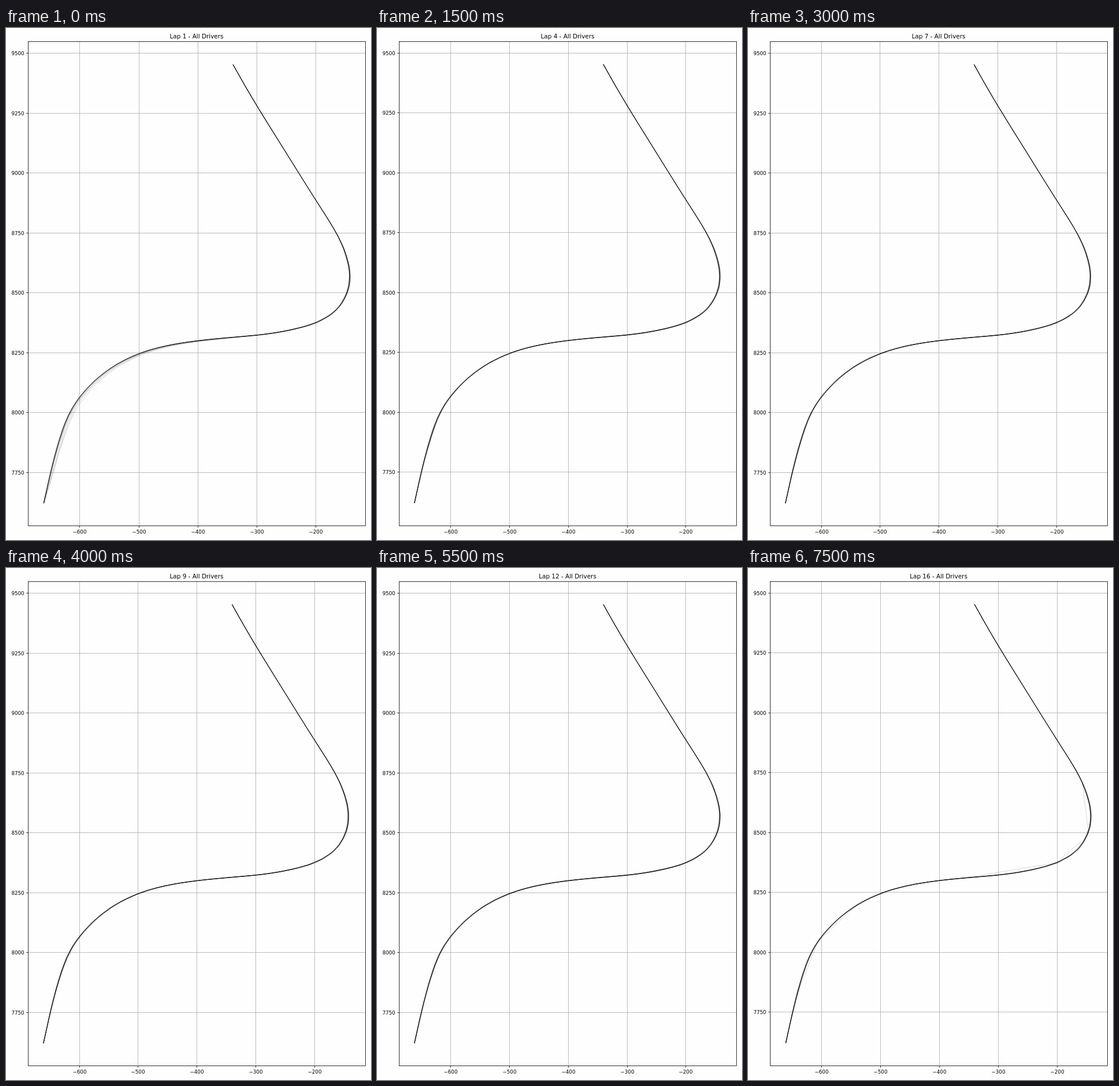
These frames come from a looping animation (632x885 px, 8 s). An HTML page:

```html
<!DOCTYPE html>
<html lang="en">
<head>
<meta charset="utf-8">
<title>Racing lines by lap</title>
<style>
html, body { margin: 0; width: 100%; height: 100%; overflow: hidden; background: #fefefe; }
svg { display: block; width: 632px; height: 885px; font: 8.7px "DejaVu Sans", sans-serif; }
.grid { stroke: #b0b0b0; stroke-width: .85; }
.axis { stroke: #000; stroke-width: .8; fill: none; }
.line { stroke: #000; stroke-width: .8; stroke-opacity: .19; fill: none; stroke-linejoin: round; }
</style>
</head>
<body>
<svg id="plot" viewBox="0 0 632 885"></svg>
<script>
const LAPS = 16, LAP_MS = 500, DRIVERS = 20;
const BOX = { left: 38.5, right: 622.5, top: 23.5, bottom: 860.5 };

// Ideal line through the corner, in the scale of the first lap.
const TRACK = [
  [393, 63], [411, 95], [434, 134], [461, 177.5], [487, 219], [507, 251], [530, 287.5],
  [547, 314], [561, 336], [573, 356.5], [583, 377], [590, 397], [594, 414], [595.3, 429],
  [594, 445], [590, 458.5], [583.5, 472], [574, 485], [560, 497], [538, 509], [515, 516.5],
  [490, 522.5], [462, 527.5], [434, 531], [400, 534], [365, 537], [332, 540.5], [305, 544.2],
  [280, 548.7], [255, 554.7], [231, 562.5], [208, 572.5], [187, 584], [168, 597.5],
  [152, 611], [137, 626.5], [125, 641], [115, 656], [106, 673.5], [98, 694], [88, 726],
  [78, 765], [71, 796], [65.3, 821.5]
];

// Place of the -600 tick and spacing of the x ticks, by lap.
const X_START = [127.9, 127.5, 127.3, 127.3, 127.2, 127.2, 127.2, 127.2, 127.2, 127.2, 127.3, 127.3, 127.7, 128, 127.9, 127.8];
const X_STEP = [102.1, 102, 101.9, 101.9, 101.8, 101.8, 101.75, 101.75, 101.75, 101.8, 101.85, 101.9, 101.8, 101.8, 101.8, 101.8];
const Y_START = [43.7, 43.6, 43.4, 43.4, 43.6, 43.6, 43.7, 43.6, 43.7, 43.6, 43.6, 43.6, 43.7, 43.45, 43.45, 43.45];
const Y_STEP = 103.5;

// Missing samples, as [driver, from y, to y].
const GAPS = {
  14: [[3, 537, 560]],
  16: [[4, 372, 458], [5, 466, 510], [5, 510, 536], [6, 583, 645], [7, 645, 735]]
};

function random(seed) {
  let s = seed;
  return () => {
    s = s + 0x6D2B79F5 | 0;
    let t = Math.imul(s ^ s >>> 15, 1 | s);
    t = t + Math.imul(t ^ t >>> 7, 61 | t) ^ t;
    return ((t ^ t >>> 14) >>> 0) / 4294967296;
  };
}

const bump = (v, from, to) => v > from && v < to ? Math.sin(Math.PI * (v - from) / (to - from)) : 0;

// Catmull-Rom point and unit normal at u, counted in track points.
function trackAt(u) {
  const i = Math.min(Math.floor(u), TRACK.length - 2), t = u - i;
  const p = k => TRACK[Math.max(0, Math.min(TRACK.length - 1, i + k))];
  const axis = n => {
    const [a, b, c, d] = [p(-1)[n], p(0)[n], p(1)[n], p(2)[n]];
    const k1 = c - a, k2 = 2 * a - 5 * b + 4 * c - d, k3 = 3 * b - a - 3 * c + d;
    return [b + (k1 * t + k2 * t * t + k3 * t ** 3) / 2, k1 + 2 * k2 * t + 3 * k3 * t * t];
  };
  const [x, dx] = axis(0), [y, dy] = axis(1), len = Math.hypot(dx, dy);
  return { x, y, nx: -dy / len, ny: dx / len };
}

function driverLine(lap, driver) {
  const rnd = random(lap * 977 + driver * 131);
  const phase = rnd() * 6.3, freq = .35 + rnd() * .3, bias = rnd() - .5;
  const gaps = (GAPS[lap] || []).filter(g => g[0] === driver);
  const wide = lap === 1 && driver < 5 ? (driver + 1) * 1.35 : 0;
  const sx = X_STEP[lap - 1] / X_STEP[0], end = TRACK.length - 1;

  const samples = [0];
  for (let u = .3 + rnd(); u < end - .3; u += .85 + rnd() * .25) samples.push(u);
  samples.push(end);
  for (const [, from, to] of gaps)
    for (const y of [from, to]) {
      const i = TRACK.findIndex(p => p[1] > y) - 1;
      samples.push(i + (y - TRACK[i][1]) / (TRACK[i + 1][1] - TRACK[i][1]));
    }
  samples.sort((a, b) => a - b);

  const points = samples.map(trackAt)
    .filter(p => !gaps.some(g => p.y > g[1] + 1 && p.y < g[2] - 1))
    .map(p => {
      const spread = .3 + .7 * bump(p.y, 350, 540) + .6 * bump(p.y, 542, 800);
      const off = spread * (bias + .8 * Math.sin(p.y * .045 * freq + phase) * (rnd() + .3));
      const slip = -wide * bump(p.y, 533, 816) ** .6;
      const x = p.x + p.nx * off - p.nx * slip * Math.sign(p.nx);
      const y = p.y + p.ny * off - p.ny * slip * Math.sign(p.ny);
      // Outside entries drift to the lower right of the ideal line.
      const px = wide ? x - 2 * Math.min(0, x - p.x - p.nx * off) : x;
      const py = wide ? y - 2 * Math.min(0, y - p.y - p.ny * off) : y;
      return (X_START[lap - 1] + (px - X_START[0]) * sx).toFixed(2) + "," +
        (py + Y_START[lap - 1] - Y_START[0]).toFixed(2);
    });
  return `<polyline class="line" points="${points.join(" ")}"/>`;
}

const line = (kind, x1, y1, x2, y2) =>
  `<line class="${kind}" x1="${x1}" y1="${y1}" x2="${x2}" y2="${y2}"/>`;
const text = (x, y, anchor, label, size = 8.7) =>
  `<text x="${x}" y="${y}" text-anchor="${anchor}" style="font-size:${size}px">${label}</text>`;
const snap = v => Math.floor(v) + .5;

function drawLap(lap) {
  const { left, right, top, bottom } = BOX;
  let grid = "", ticks = "", lines = "";
  for (let i = 0; i < 5; i++) {
    const x = snap(X_START[lap - 1] + i * X_STEP[lap - 1]);
    grid += line("grid", x, top, x, bottom);
    ticks += line("axis", x, bottom, x, bottom + 3.2) + text(x, 873.6, "middle", "\u2212" + (600 - i * 100));
  }
  for (let i = 0; i < 8; i++) {
    const y = snap(Y_START[lap - 1] + i * Y_STEP);
    grid += line("grid", left, y, right, y);
    ticks += line("axis", left - 3.2, y, left, y) + text(31.6, y + 3.2, "end", 9500 - i * 250);
  }
  for (let d = 0; d < DRIVERS; d++) lines += driverLine(lap, d);
  const frame = `<rect class="axis" x="${left}" y="${top}" width="${right - left}" height="${bottom - top}"/>`;
  return grid + lines + ticks + frame + text(330, 18.3, "middle", `Lap ${lap} - All Drivers`, 10.45);
}

const plot = document.getElementById("plot");
const pictures = Array.from({ length: LAPS }, (_, i) => drawLap(i + 1));
const start = performance.now();
let shown = -1;

function tick() {
  const lap = Math.floor((performance.now() - start) / LAP_MS) % LAPS;
  if (lap !== shown) plot.innerHTML = pictures[shown = lap];
  requestAnimationFrame(tick);
}
tick();
</script>
</body>
</html>
```
